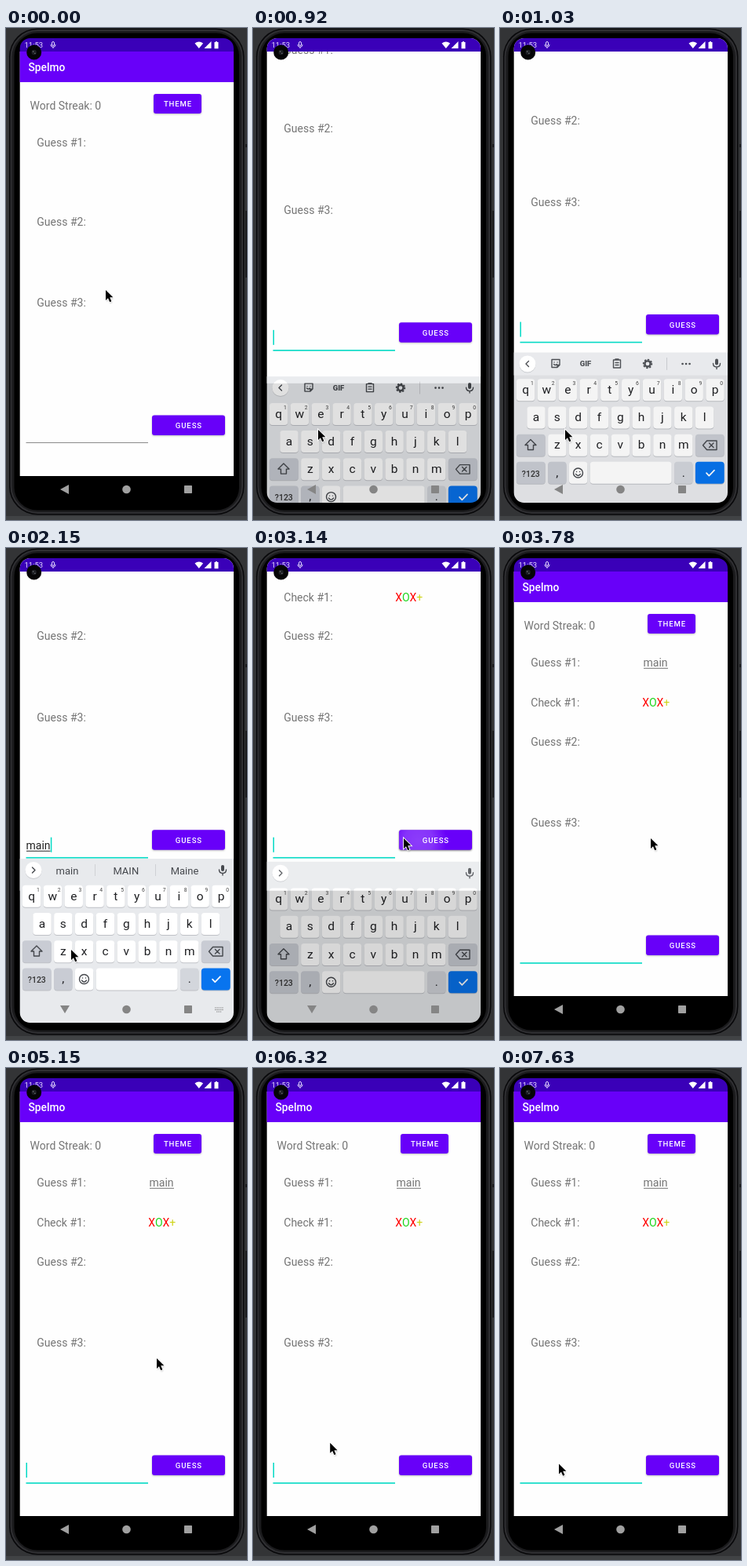
Animation, 307 px wide and 627 px high, one loop 8000 ms. Source, as an HTML page:

```html
<!DOCTYPE html>
<html lang="en">
<head>
<meta charset="utf-8">
<title>Word game on a phone</title>
<style>
html, body { margin: 0; width: 100%; height: 100%; overflow: hidden; background: #333436; }
svg { display: block; width: 100%; height: 100%; font-family: Roboto, Arial, sans-serif; }
text { white-space: pre; }
.label { font-size: 14px; fill: #757575; }
.btn { font-size: 9.6px; font-weight: 500; letter-spacing: .86px; fill: #fff; text-anchor: middle; }
.key { font-size: 15.5px; fill: #202124; text-anchor: middle; }
.hint { font-size: 6.8px; fill: #444; text-anchor: middle; }
.word { font-size: 13px; fill: #45484d; text-anchor: middle; }
.line { fill: none; stroke: #45484d; stroke-width: 1.4; stroke-linecap: round; stroke-linejoin: round; }
.brand { fill: #6800f9; }
</style>
</head>
<body>
<svg viewBox="0 0 307 627" preserveAspectRatio="none">
  <defs>
    <clipPath id="screen"><rect x="17.7" y="13" width="272.3" height="592" rx="13"/></clipPath>
    <clipPath id="guessClip"><rect x="186" y="493.5" width="93" height="25.5" rx="3"/></clipPath>
    <radialGradient id="glow">
      <stop offset="0" stop-color="#fff" stop-opacity=".24"/>
      <stop offset=".5" stop-color="#fff" stop-opacity=".2"/>
      <stop offset="1" stop-color="#fff" stop-opacity="0"/>
    </radialGradient>
    <filter id="soft" x="-20%" y="-50%" width="140%" height="200%"><feGaussianBlur stdDeviation="1"/></filter>
  </defs>

  <!-- phone body -->
  <rect width="307" height="627" fill="#333436"/>
  <rect y="622" width="307" height="5" fill="#414345"/>
  <path d="M305 148h2v4h-2zM305 233h2v85h-2z" fill="#17181a"/>
  <rect x="4" y=".5" width="299.5" height="620" rx="36" fill="#08080a"/>
  <rect x="6.5" y="3" width="294.5" height="615" rx="34" fill="#1b1b1d" stroke="#2f2f32" stroke-width="2"/>
  <rect x="10.500" y="6.500" width="286.500" height="608" rx="29" fill="#000"/>

  <g clip-path="url(#screen)">
    <rect x="17" y="13" width="273" height="592" fill="#000"/>

    <!-- app window -->
    <g id="app">
      <rect x="17" y="30" width="273" height="541" fill="#fefefe"/>
      <rect class="brand" x="17" y="30" width="273" height="39"/>
      <text x="28.5" y="55" font-size="13.8" font-weight="500" fill="#fff">Spelmo</text>
      <g class="label">
        <text x="30.6" y="103.500">Word Streak: 0</text>
        <text x="39.3" y="151">Guess #1:</text>
        <text x="39.3" y="251.5">Guess #2:</text>
        <text x="39.3" y="355">Guess #3:</text>
        <g id="result">
          <text x="182.5" y="151">main</text>
          <path d="M183 153.300h31" stroke="#757575"/>
          <text x="39.3" y="202">Check #1:</text>
          <text x="181.300" y="202"><tspan fill="#f00">X</tspan><tspan fill="#1ed61e">O</tspan><tspan fill="#f00">X</tspan><tspan fill="#cfd41c">+</tspan></text>
        </g>
      </g>
      <rect x="188" y="85" width="61" height="25" rx="3" filter="url(#soft)" opacity=".25"/>
      <rect class="brand" x="188" y="84" width="61" height="25" rx="3"/>
      <text class="btn" x="219" y="100.300">THEME</text>
      <rect id="lift" x="186" y="494.500" width="93" height="25.500" rx="3" filter="url(#soft)"/>
      <rect class="brand" x="186" y="493.500" width="93" height="25.500" rx="3"/>
      <g clip-path="url(#guessClip)"><circle id="ripple" cx="211" cy="507" fill="url(#glow)"/></g>
      <text class="btn" x="232.900" y="510">GUESS</text>
      <rect id="rule" x="25.500" width="155.500"/>
      <text id="typed" x="25.500" y="518" font-size="14" fill="#212121"></text>
      <rect id="mark" x="26" y="520" height="1" fill="#212121"/>
      <rect id="caret" y="503" width="1.500" height="19" fill="#03dac5"/>
    </g>

    <!-- keyboard -->
    <g id="board">
      <rect x="17" y="396" width="273" height="230" fill="#e8eaed"/>
      <circle cx="35" cy="411.500" r="10.500" fill="#c9cbcf"/>
      <circle cx="35" cy="410.500" r="10.500" fill="#fff"/>
      <path id="chevron" class="line"/>
      <g id="tools" class="line">
        <path d="M66 405h10v7l-3 3h-7zM73 415v-3h3M69 408.500h.1M73 408.500h.1M68.500 411q2 2 4 0"/>
        <text x="109" y="414" font-size="9.500" font-weight="900" text-anchor="middle" fill="#45484d" stroke="none">GIF</text>
        <path d="M144.500 405.500h9v10h-9zM147 404.500h4M147 409h4M147 412h4"/>
        <circle cx="188" cy="410.500" r="3.600" stroke-width="2.400"/>
        <circle cx="188" cy="410.500" r="5.300" stroke-width="1.800" stroke-dasharray="1 3.160"/>
        <path d="M212.500 403v15" stroke="#c6c8cc" stroke-width="1"/>
        <path d="M232.500 410.500h.1M237 410.500h.1M241.500 410.500h.1" stroke-width="2.600"/>
      </g>
      <g id="words">
        <path d="M113.500 403v15M190.500 403v15" stroke="#cfd1d5"/>
        <text class="word" x="78" y="415.500"></text>
        <text class="word" x="152.800" y="415.500"></text>
        <text class="word" x="227.500" y="415.500"></text>
      </g>
      <rect x="274" y="404" width="4" height="8" rx="2" fill="#45484d"/>
      <path class="line" d="M271.500 410q0 4.500 4.500 4.500t4.500-4.500M276 414.500v2.500"/>
      <g id="keys"></g>
      <g class="line">
        <path d="M39 507l7 7h-3.500v6h-7v-6H32z"/>
        <path d="M263.500 508.500h12.500v11.500h-12.500l-5-5.700zM266.500 511.500l5.500 5.500M272 511.500l-5.500 5.500"/>
        <circle cx="99.500" cy="549.500" r="6"/>
        <path d="M96.500 551q3 4 6 0M97.500 548h.1M101.500 548h.1"/>
        <path d="M263 549.700l3.300 3.500 6.700-7" stroke="#fff" stroke-width="1.700"/>
      </g>
      <path id="mini" d="M266 586h11M266 588.500h11M268 591h7" stroke="#858585" stroke-dasharray="1.500 .8"/>
    </g>

    <!-- navigation and status bars -->
    <g id="nav">
      <path id="back"/>
      <circle cx="153.500" cy="588" r="5.300"/>
      <rect x="227" y="583" width="10" height="10" rx=".8"/>
    </g>
    <rect x="17" y="13" width="273" height="17" fill="#3a00b8"/>
    <text x="23.500" y="25.300" font-size="9.500" fill="#e6dcff">11:53</text>
    <g fill="none" stroke="#e6dcff"><rect x="58.500" y="17.500" width="3" height="5" rx="1.500"/><path d="M57 21q0 3.300 3 3.300t3-3.300M60 24.300v1.700"/></g>
    <g fill="#fff">
      <path d="M240.500 19.500q5.300-4 10.600 0l-5.300 6.500z"/>
      <path d="M261.500 17v9h-9z"/>
      <path d="M265.500 18h1.500v-1h2v1h1.500v8.200h-5z"/>
    </g>
  </g>

  <circle cx="35.700" cy="31" r="9.500" fill="#050506"/>
  <circle cx="35.700" cy="31" r="3.200" fill="#1c1e22"/>
  <path d="M34 30h1.300M36.300 32.300h1.200" stroke="#8f9296"/>

  <g id="mouse">
    <path d="M1.200 1.500v13l3-2.800 2.200 5 2.200-.9-2.200-5h4.200z" opacity=".3" filter="url(#soft)"/>
    <path d="M.5 0v13l3-2.800 2.200 5 2.200-.9-2.200-5h4.200z" stroke="#fff" stroke-width="1.800" paint-order="stroke"/>
  </g>
</svg>
<script>
const $ = id => document.getElementById(id);
const set = (id, attrs) => {
  for (const k in attrs) $(id).setAttribute(k, attrs[k]);
};
const show = (id, on) => $(id).style.display = on ? '' : 'none';
function add(tag, attrs, text = '') {
  const e = document.createElementNS('http://www.w3.org/2000/svg', tag);
  for (const k in attrs) e.setAttribute(k, attrs[k]);
  e.textContent = text;
  $('keys').append(e);
}

// Keys sit on a grid: columns from 0 to 9, some wider than one column
const PITCH = 26.82, GREY = '#c9ccd4', WHITE = '#fff';
function key(col, row, label = '', fill = WHITE, cols = 1, cls = 'key') {
  const x = 20.9 + PITCH * col, y = 429.8 + 35.2 * row, w = PITCH * cols - 3.4;
  const box = { x, width: w, height: 28, rx: 4 };
  add('rect', { ...box, y: y + 1, fill: '#bfc1c6' });
  add('rect', { ...box, y, fill });
  add('text', { class: cls, x: x + w / 2, y: y + 18.7 }, label);
}
['qwertyuiop', 'asdfghjkl', 'zxcvbnm'].forEach((letters, row) => {
  [...letters].forEach((c, i) => key(i + [0, .5, 1.5][row], row, c));
});
for (let i = 0; i < 10; i++) add('text', { class: 'hint', x: 40.8 + PITCH * i, y: 438 }, String((i + 1) % 10));
key(0, 2, '', GREY, 1.5);
key(8.5, 2, '', GREY, 1.5);
key(0, 3, '?123', GREY, 1.5, 'btn');
$('keys').lastChild.style.cssText = 'fill:#333;font-size:10.5px;letter-spacing:0';
key(1.5, 3, ',', GREY);
key(2.5, 3);
key(3.5, 3, '', WHITE, 4);
key(7.5, 3, '.', '#d3d6dc');
key(8.5, 3, '', '#0874ee', 1.5);

// Motion
const smooth = u => u * u * (3 - 2 * u);
const clamp = u => Math.max(0, Math.min(1, u));

// Progress from a to b in even jumps, as the screen refreshes every 57 ms
function steps(t, a, b) {
  if (t < a) return 0;
  const n = Math.round((b - a) / 57) + 1, gap = (b - a) / (n - 1);
  return Math.min(1, (Math.floor((t - a) / gap + .01) + 1) / n);
}

const FOCUS = 740, COMMIT = 2150, SEND = 3080, CLOSE = 3140, BLINK = 505;
const strokes = [1510, 1620, 1800, 1910];
const hops = [
  { from: 60, to: 570, x: 82.5, y: 512 },
  { from: 2500, to: 2850, x: 191.5, y: 370 },
  { from: 6040, to: 6380, x: 74.5, y: 504.5 }
];

function moveMouse(t) {
  let x = 126.5, y = 334;
  for (const h of hops) {
    const u = smooth(steps(t, h.from, h.to));
    x += (h.x - x) * u;
    y += (h.y - y) * u;
  }
  set('mouse', { transform: `translate(${x} ${y})` });
}

function moveKeyboard(t) {
  const open = 1 - (1 - steps(t, FOCUS, 1090)) ** 2.5;
  const shut = steps(t, CLOSE, 3370);
  const hide = smooth(clamp(1.25 * shut));
  const back = smooth(clamp((shut - .2) / .45));
  set('app', { transform: `translate(0 ${-134.3 * (open - back)})` });
  set('board', { transform: `translate(0 ${400 * (1 - open) + 153 * hide * hide})`, opacity: open - hide });

  const down = open > .98 && hide < .8;
  set('nav', { fill: open > .6 && hide < .8 ? '#858585' : '#a0a0a0' });
  set('back', { d: down ? 'M69 583h12l-6 10z' : 'M80 582v12l-11-6z' });
  show('mini', down && t < SEND);
}

function typeWord(t) {
  const sent = t >= SEND, focus = t >= FOCUS;
  const count = sent ? 0 : strokes.filter(s => t >= s).length;
  const marked = t < COMMIT ? Math.min(count, 3) : count;
  const field = $('typed');
  field.textContent = 'main'.slice(0, count);
  set('mark', { width: marked ? field.getSubStringLength(0, marked) - .5 : 0 });
  set('caret', { x: 25.5 + (count ? field.getComputedTextLength() + .3 : 0) });
  set('rule', focus ? { y: 528.2, height: 1.6, fill: '#03dac5' } : { y: 528, height: 1, fill: '#8a8a8a' });

  // The caret starts a new blink after each edit
  const edit = [FOCUS, ...strokes, COMMIT, SEND].filter(s => t >= s).pop();
  show('caret', focus && Math.floor((t - edit) / BLINK) % 2 === 0);

  const tools = t < strokes[0], part = 'main'.slice(0, marked);
  const hints = [part, part.toUpperCase(), 'Maine'.slice(0, marked + 1)];
  document.querySelectorAll('.word').forEach((e, i) => e.textContent = hints[i]);
  show('words', marked);
  show('tools', tools);
  set('chevron', { d: tools ? 'M36.5 407l-3.5 3.5 3.5 3.5' : 'M33.5 407l3.5 3.5-3.5 3.5' });
  show('result', sent);
}

function pressGuess(t) {
  const grow = steps(t, 3020, 3370);
  const press = grow ? 1 - steps(t, 3550, 3780) : 0;
  set('ripple', { r: 100 * grow ** 1.2, opacity: press });
  set('lift', { opacity: .25 + .25 * press });
}

function draw(now) {
  const t = now % 8000;
  moveMouse(t);
  moveKeyboard(t);
  typeWord(t);
  pressGuess(t);
}

let begin;
function tick(now) {
  begin ??= now;
  draw(now - begin);
  requestAnimationFrame(tick);
}
draw(0);
requestAnimationFrame(tick);
</script>
</body>
</html>
```
